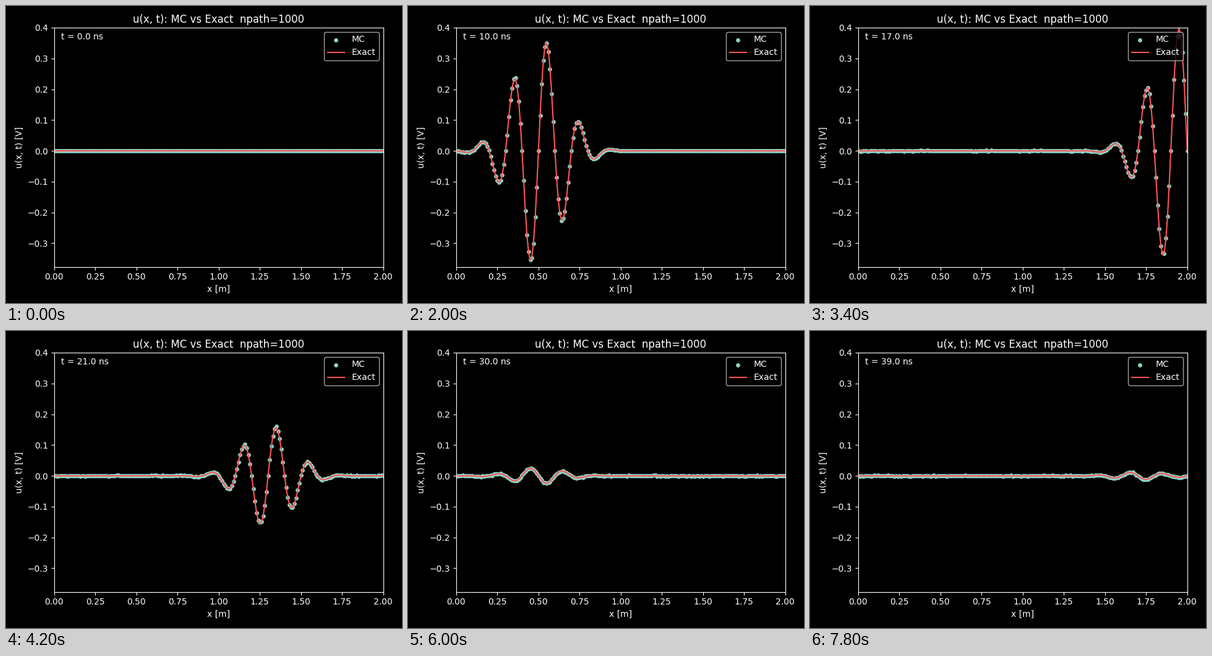
Write a matplotlib script that moves like this. It is 640x480 px and loops after 8000 ms.

```python
import numpy as np
import matplotlib.pyplot as plt
from matplotlib.animation import FuncAnimation

FRAMES, INTERVAL = 40, 200
LENGTH = 2.0            # line length [m]
SPEED = 0.2             # wave speed [m/ns]
FREQ = 1.0              # carrier [GHz]
SIGMA, DELAY = 0.75, 7.5    # pulse width and centre [ns]
ALPHA = 0.14            # attenuation [1/m]
GAMMA_S, GAMMA_L = 0.2, -0.6
AMP = 0.4

x = np.linspace(0, LENGTH, 201)


def pulse(t):
    s = t - DELAY
    return -AMP * np.sin(2 * np.pi * FREQ * s) * np.exp(-s**2 / (2 * SIGMA**2))


def exact(t):
    """Sum of the forward and reflected waves on the line."""
    u = np.zeros_like(x)
    gain = 1.0
    for trip in range(3):
        start = 2 * LENGTH * trip
        for path, k in ((start + x, gain),
                        (start + 2 * LENGTH - x, gain * GAMMA_L)):
            u += k * np.exp(-ALPHA * path) * pulse(t - path / SPEED)
        gain *= GAMMA_S * GAMMA_L
    return u


def monte_carlo(t, u):
    """Exact values with sampling noise behind the wave front."""
    rng = np.random.default_rng(1000 + int(t))
    front = np.clip((SPEED * (t - 5.5) - x) / 0.3, 0, 1)
    noise = 0.0008 * front + 0.006 * np.abs(u)
    return u + noise * rng.standard_normal(x.size)


plt.style.use("dark_background")
plt.rcParams["font.family"] = "DejaVu Sans"
fig, ax = plt.subplots(figsize=(6.4, 4.8), dpi=100)
dots = ax.scatter(x, 0 * x, s=15, color="#8dd3c7", label="MC")
line, = ax.plot(x, 0 * x, color="#ff5555", lw=1.5, label="Exact")
clock = ax.text(0.02, 0.95, "", transform=ax.transAxes)
ax.set(xlim=(0, LENGTH), ylim=(-0.377, 0.4),
       xlabel="x [m]", ylabel="u(x, t) [V]",
       title="u(x, t): MC vs Exact  npath=1000")
ax.legend(loc="upper right")
fig.tight_layout()
fig.subplots_adjust(top=1 - 35 / 480)


def update(i):
    t = float(i)
    u = exact(t)
    line.set_ydata(u)
    dots.set_offsets(np.column_stack((x, monte_carlo(t, u))))
    clock.set_text(f"t = {t:.1f} ns")
    return dots, line, clock


anim = FuncAnimation(fig, update, frames=FRAMES, interval=INTERVAL,
                     repeat=True, repeat_delay=0)
plt.show()
```
